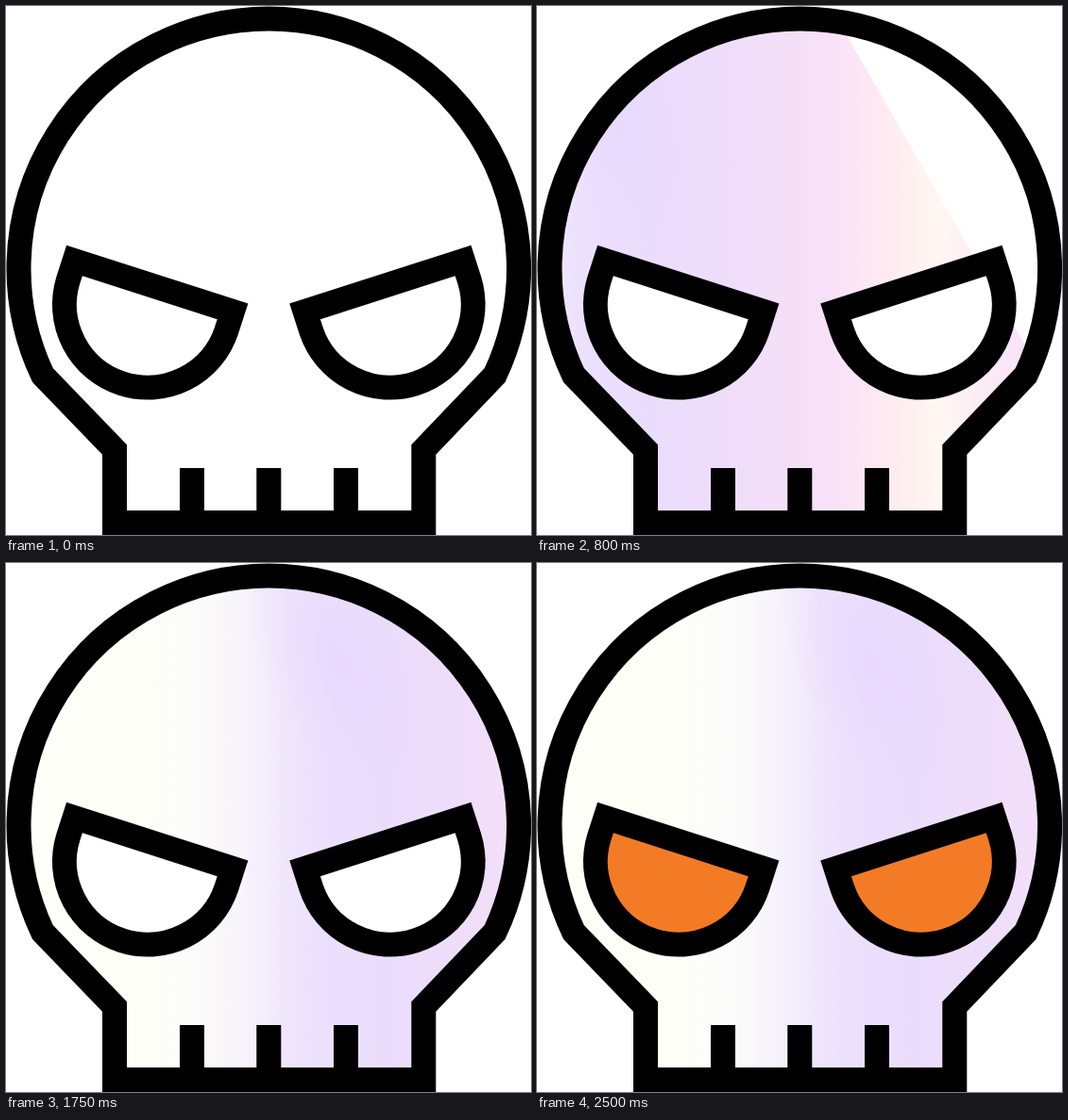
These frames come from a looping animation (556x561 px, 2850 ms). An HTML page with a canvas:

```html
<!DOCTYPE html>
<html lang="en">
<head>
<meta charset="utf-8">
<title>Skull</title>
<style>
  html, body { margin: 0; width: 100%; height: 100%; overflow: hidden; background: #fff; }
  canvas { display: block; }
</style>
</head>
<body>
<canvas id="stage" width="556" height="561"></canvas>
<script>
const ctx = document.getElementById('stage').getContext('2d');
const LOOP = 2850, STEP = 200, SHIFT = 140, LAST = 6, BLINK_START = 1400;

const skull = new Path2D('M38.9 391.5A264.8 264.8 0 1 1 517.7 391.5L442.3 470.5V548H115V470.5Z');
const teeth = new Path2D('M197 490V540M278.3 490V540M360 490V540');
const eye = new Path2D('M72.5 270L240 324L233.4 344.5A88 88 0 0 1 65.9 290.5Z');
const sheen = new Path2D('M0 0H590L913 561H0Z');

// Pearl colours by x position in the sheen
const pearl = ctx.createLinearGradient(0, 0, 900, 0);
[[30, '#fffffa'], [130, '#fefff7'], [200, '#fcfcfa'], [250, '#f7f4fc'], [300, '#efe5fc'],
 [345, '#ebdffd'], [400, '#eaddfc'], [470, '#eeddfa'], [540, '#f4dff8'], [590, '#f8e1f8'],
 [630, '#fde6f4'], [680, '#fff1ef'], [705, '#fff7f3'], [740, '#fdeef5'], [790, '#fae3f8'],
 [840, '#f8dffb'], [900, '#f8dffb']
].forEach(([x, color]) => pearl.addColorStop(x / 900, color));

const glow = ctx.createRadialGradient(0, 0, 0, 0, 0, 1);
glow.addColorStop(0, 'rgba(230,214,254,.6)');
glow.addColorStop(1, 'rgba(230,214,254,0)');

function drawSheen(step) {
  ctx.save();
  ctx.clip(skull);
  ctx.translate((step - LAST) * SHIFT, 0);
  ctx.fillStyle = pearl;
  ctx.fill(sheen);
  ctx.translate(350, 105);
  ctx.rotate(-0.45);
  ctx.scale(75, 150);
  ctx.fillStyle = glow;
  ctx.fillRect(-1, -1, 2, 2);
  ctx.restore();
}

function drawEye(color) {
  ctx.fillStyle = color;
  ctx.fill(eye);
  ctx.stroke(eye);
}

function draw(now) {
  const t = now % LOOP;
  const lit = t >= BLINK_START && (t - BLINK_START) % 550 < 350;
  const color = lit ? '#f47b26' : '#fff';

  ctx.fillStyle = '#fff';
  ctx.fillRect(0, 0, 556, 561);
  drawSheen(Math.min(LAST, Math.floor(t / STEP)));

  ctx.lineWidth = 26;
  ctx.stroke(skull);
  ctx.stroke(teeth);
  drawEye(color);
  ctx.save();
  ctx.translate(556.6, 0);
  ctx.scale(-1, 1);
  drawEye(color);
  ctx.restore();
}

const start = performance.now();
function tick() {
  draw(performance.now() - start);
  requestAnimationFrame(tick);
}
tick();
</script>
</body>
</html>
```
